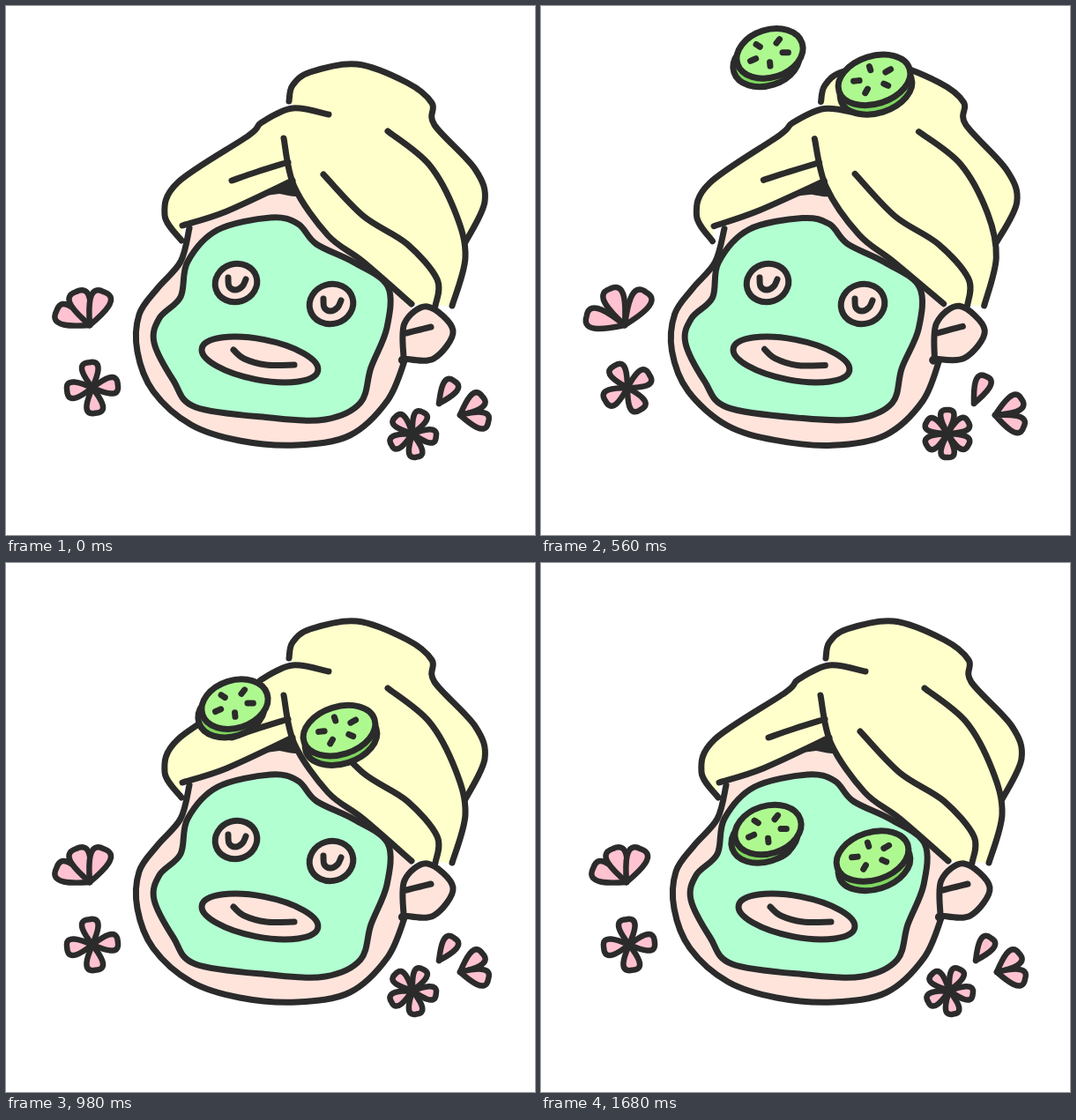
Animation of 600 by 600 pixels, one loop 1820 ms. Source, as an HTML page with a canvas:

```html
<!DOCTYPE html>
<html lang="en">
<head>
<meta charset="utf-8">
<title>Face mask</title>
<style>
html, body { margin: 0; width: 100%; height: 100%; overflow: hidden; background: #fff; }
canvas { display: block; width: 600px; height: 600px; }
</style>
</head>
<body>
<canvas id="stage" width="600" height="600"></canvas>
<script>
const ctx = document.getElementById('stage').getContext('2d');
const INK = '#2b2b2b', SKIN = '#ffe4dc', MASK = '#b2ffd2', TOWEL = '#ffffcb',
      PETAL = '#ffc2d0', SLICE = '#aef98f', RIND = '#7fd65f';
const STEP = 140, ORDER = 'ACBACBCACABCA';
const FALL = 35.4, LANDED = 284, TILT = -.31;

// Each redrawing of the face: sideways shift, how far the flowers open and turn (degrees).
const POSES = {
  A: { shift: 0, open: 0, turn: 0 },
  B: { shift: -1, open: 1, turn: 35 },
  C: { shift: -4, open: .7, turn: 66 }
};

// Key points of the hand-drawn lines, joined by smooth curves.
const LINES = {
  head: '208,252 198,290 172,320 151,350 149,392 167,437 210,475 265,493 330,498 390,487 433,447 453,400',
  mask: '300,240 331,247 352,270 395,291 433,318 432,365 414,410 402,450 362,469 300,467 215,455 190,425 168,382 174,354 198,330 206,290 240,254',
  smile: '258,390 270,400 295,407 327,407',
  crown: '321,108 325,90 345,75 398,66 455,87 483,110 486,135 532,185 543,222 521,268',
  left: '366,123 325,116 290,132 275,147 195,200 180,237 199,266',
  hem: '200,249 250,233 325,198',
  front: '315,150 327,205 365,260 405,290 460,338',
  back: '433,142 480,180 510,235 521,285 506,340',
  tuck: '256,198 285,188 320,177',
  fold: '360,191 405,238 455,270 489,310 487,340',
  ear: '451,400 452,360 478,341 507,368 485,400 451,400',
  lobe: '454,371 470,367 482,364',
  hair: '287,216 325,196 331,215 310,213',
  lid: '-9,-6 -8,4 -1,8 7,4 11,-4'
};

const parse = text => text.split(' ').map(p => p.split(',').map(Number));
const radians = degrees => degrees * Math.PI / 180;

// Adds a smooth curve through the points to the path.
function trace(path, pts, closed) {
  const n = pts.length;
  const at = i => closed ? pts[(i + n) % n] : pts[Math.max(0, Math.min(n - 1, i))];
  path.lineTo(...pts[0]);
  for (let i = 0; i < (closed ? n : n - 1); i++) {
    const [a, b, c, d] = [at(i - 1), at(i), at(i + 1), at(i + 2)];
    path.bezierCurveTo(b[0] + (c[0] - a[0]) / 6, b[1] + (c[1] - a[1]) / 6,
                       c[0] - (d[0] - b[0]) / 6, c[1] - (d[1] - b[1]) / 6, ...c);
  }
  return path;
}

function paint(path, fill, width = 7) {
  if (fill) { ctx.fillStyle = fill; ctx.fill(path); }
  if (width) { ctx.lineWidth = width; ctx.stroke(path); }
}

const line = pts => paint(trace(new Path2D(), pts));
const blob = (pts, fill) => paint(trace(new Path2D(), pts, true), fill);

function area(fill, ...edges) {
  const path = new Path2D();
  edges.forEach(edge => trace(path, edge));
  paint(path, fill, 0);
}

function oval(x, y, rx, ry, tilt, fill) {
  const path = new Path2D();
  path.ellipse(x, y, rx, ry, tilt, 0, 2 * Math.PI);
  paint(path, fill);
}

function petal(length, width) {
  const path = new Path2D();
  path.moveTo(0, 0);
  path.bezierCurveTo(length * .4, width * .4, length * 1.04, width, length, 0);
  path.bezierCurveTo(length * 1.04, -width, length * .4, -width * .4, 0, 0);
  paint(path, PETAL, 6.5);
}

// Petals spread evenly, gap degrees apart, around the direction aim.
function flower(x, y, count, length, width, aim, gap) {
  for (let i = 0; i < count; i++) {
    ctx.save();
    ctx.translate(x, y);
    ctx.rotate(radians(aim + (i - (count - 1) / 2) * gap));
    petal(length, width);
    ctx.restore();
  }
}

function flowers({ open, turn }) {
  const count = 5 + Math.ceil(open);
  flower(95, 362, 3, 41 + 5 * open, 21, -112, 45 + 14 * open);
  flower(98, 433, 4, 29, 17, 38 + turn, 90);
  flower(461, 485, count, 27, 14, 80 + turn * .6, 360 / count);
  flower(491, 451, 1, 31 + 4 * open, 16, -56 - 14 * open, 0);
  flower(515, 464, 2, 33 + 3 * open, 17, -13 + 13 * open, 54);
}

function eye(x, y, r) {
  oval(x, y, r, r - 2.5, -.3, SKIN);
  line(parse(LINES.lid).map(p => [p[0] + x, p[1] + y]));
}

function person({ shift, open, turn }) {
  const shape = {};
  for (const name in LINES) {
    shape[name] = parse(LINES[name]).map(([x, y]) =>
      [x + open * Math.sin(y / 20 + turn), y + open * Math.sin(x / 18 + turn)]);
  }
  const { head, mask, smile, crown, left, hem, front, back, tuck, fold, ear, lobe, hair } = shape;

  area(SKIN, head, [...front].reverse());
  line(head);
  ctx.translate(shift, 0);
  blob(mask, MASK);
  eye(261, 314, 24);
  eye(369, 338, 25);
  oval(288, 401, 67, 23, .19, SKIN);
  line(smile);
  area(INK, hair);
  area(TOWEL, crown);
  area(TOWEL, left, hem, front, [...back].reverse());
  [crown, left, hem, front, back, tuck, fold].forEach(line);
  blob(ear, SKIN);
  line(lobe);
}

function slice(x, y, rx, lean, depth, aim) {
  const ry = 27;
  oval(x + lean, y + depth, rx, ry, TILT, RIND);
  oval(x, y, rx, ry, TILT, SLICE);
  ctx.save();
  ctx.translate(x - 1, y - 1);
  ctx.rotate(TILT);
  for (let i = 0; i < 5; i++) {
    const a = radians(aim + 72 * i);
    const spot = r => [20 * r * Math.cos(a), 13 * r * Math.sin(a)];
    line([spot(.82), spot(1.16)]);
  }
  ctx.restore();
}

function draw(k) {
  const pose = POSES[ORDER[k]];
  const fall = (k - 3) * FALL;
  const nudge = fall > LANDED ? 2 : 0;
  ctx.setTransform(1, 0, 0, 1, 0, 0);
  ctx.fillStyle = '#fff';
  ctx.fillRect(0, 0, 600, 600);
  ctx.strokeStyle = INK;
  ctx.lineCap = ctx.lineJoin = 'round';

  ctx.translate(nudge, 0);
  flowers(pose);
  person(pose);

  ctx.setTransform(1, 0, 0, 1, -nudge, Math.min(fall, LANDED));
  slice(259.5, 18.5, 38.5, -4, 9.5, -118);
  slice(378, 48.5, 42, 2, 10.5, -90);
}

const start = performance.now();
function tick() {
  const t = Math.max(0, performance.now() - start);
  draw(Math.floor(t / STEP) % ORDER.length);
  requestAnimationFrame(tick);
}
tick();
</script>
</body>
</html>
```
